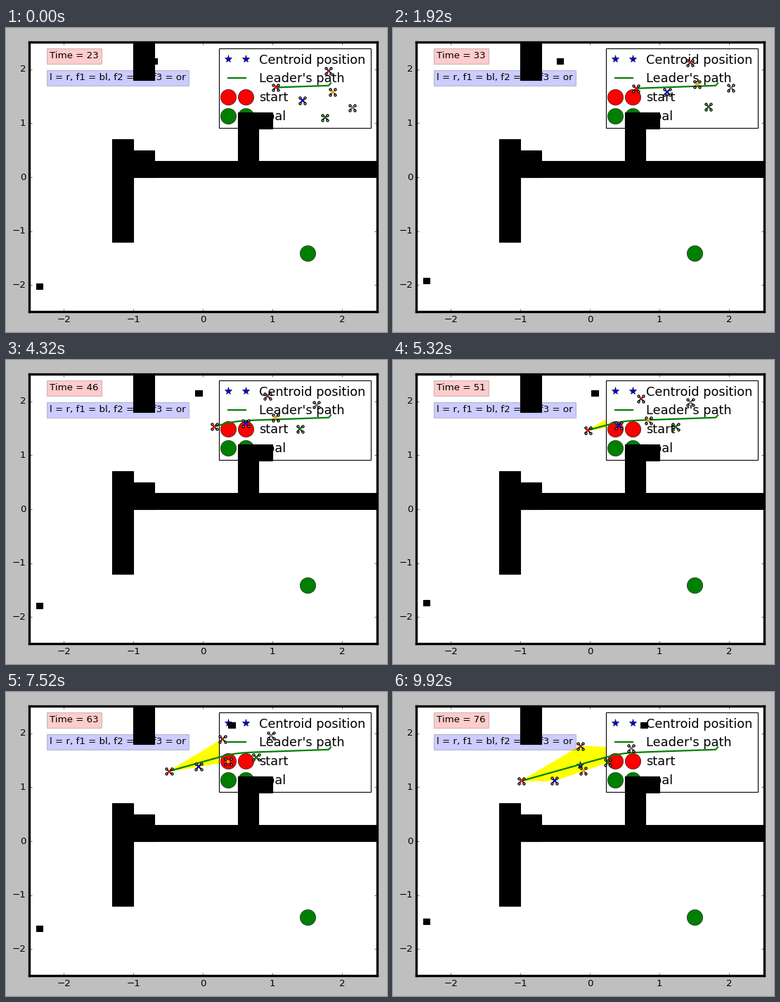
These frames come from a looping animation (542 px wide and 432 px high, 10000 ms). A matplotlib script:

```python
import numpy as np
import matplotlib.pyplot as plt
from matplotlib.animation import FuncAnimation
from matplotlib.patches import Polygon, Rectangle

plt.style.use("classic")

W, H, DPI = 542, 432, 80
LEFT, RIGHT, TOP, BOTTOM = 32.6, 527.6, 20.5, 403.5
SX, SY = (RIGHT - LEFT) / 5, (BOTTOM - TOP) / 5
TICK, LOOP = 40, 10000
T0, T1 = 23, 76

# Followers pass these pixel positions at the key times
KEY_TIMES = [23, 33, 56, 76]
FOLLOWERS = {
    "blue": [(421.5, 103), (390, 91), (301, 97.5), (229.5, 126)],
    "orange": [(464.5, 91), (432.5, 80), (343.5, 91), (270.5, 112)],
    "green": [(453.5, 127.5), (448.5, 112), (383.5, 93), (305.5, 100)],
    "gray": [(492.5, 113.5), (480.5, 85), (403.5, 59), (338.5, 80)],
    "brown": [(458.5, 61), (422.5, 49.5), (333.5, 60), (266.5, 77)],
}
COLORS = ["red", *FOLLOWERS]

# x, y, width, height in axes units
WALLS = [(-1.3, -1.2, 0.3, 1.9), (-1, 0, 0.3, 0.5), (-1, 0, 3.5, 0.3),
         (-1, 1.8, 0.3, 0.7), (0.5, 0.2, 0.3, 1.0), (0.5, 0.9, 0.5, 0.3)]


def to_data(points):
    """Pixels from the top left corner to axes units."""
    p = np.asarray(points, float)
    return np.column_stack([(p[:, 0] - LEFT) / SX - 2.5,
                            2.5 - (p[:, 1] - TOP) / SY])


def clock(ms):
    """Whole simulation seconds shown at a moment of the loop."""
    return T0 + (T1 - T0) * ms // (LOOP - 2 * TICK)


def path_y(x):
    """Nearly level on the right, bending smoothly into a descent."""
    return 84 - 0.035 * (x - 397) + 0.245 * 8 * np.logaddexp(0, (325 - x) / 8)


def lead_x(t):
    return 383.5 - 3.79 * (t - T0)


# One cubic per follower and axis
CURVES = [np.polyfit(np.subtract(KEY_TIMES, T0), p, 3)
          for p in FOLLOWERS.values()]


def robots(t):
    x = lead_x(t)
    s = t - T0
    points = [(x, path_y(x))]
    points += [np.array([s**3, s**2, s, 1]) @ c for c in CURVES]
    return to_data(points)


def trail(t):
    x = np.linspace(459, lead_x(t), 60)
    return to_data([(462, 78.5), *zip(x, path_y(x))])


fig = plt.figure(figsize=((W + 0.01) / DPI, (H + 0.01) / DPI), dpi=DPI,
                 facecolor="0.75")
ax = fig.add_axes([LEFT / W, 1 - BOTTOM / H, (RIGHT - LEFT) / W,
                   (BOTTOM - TOP) / H])
ax.set_xlim(-2.5, 2.5)
ax.set_ylim(-2.5, 2.5)
ax.set_xticks(range(-2, 3))
ax.set_yticks(range(-2, 3))
for spine in ax.spines.values():
    spine.set_linewidth(3)


def block(x, y, w, h):
    return ax.add_patch(Rectangle((x, y), w, h, fc="k", ec="k", zorder=6))


def note(y, text, color):
    return ax.text(-2.2, y, text, fontsize=12,
                   bbox=dict(facecolor=color, alpha=0.2))


for wall in WALLS:
    block(*wall)
top_box = block(0, 0, 0.1, 0.1)
left_box = block(0, 0, 0.1, 0.1)

hull = ax.add_patch(Polygon([(0, 0)] * 3, fc="yellow", ec="yellow", zorder=1))
star, = ax.plot([], [], "b*", ms=10, zorder=4, label="Centroid position")
path, = ax.plot([], [], "g-", lw=2, zorder=7, label="Leader's path")
start, = ax.plot([], [], "ro", ms=20, label="start")
goal, = ax.plot([1.505], [-1.41], "go", ms=20, label="goal")
ax.legend(handles=[star, path, start, goal], loc="upper right", fontsize=16,
          numpoints=2, framealpha=1)

label = note(2.2, "", "red")
# The wide gap lies behind the top wall
note(1.8, "l = r, f1 = bl, f2 =\u2003\u2003f3 = or", "blue")

arms, = ax.plot([], [], "kx", ms=7.5, mew=1.7, zorder=8)
rotors, = ax.plot([], [], "o", ms=2.7, mfc="white", mec="k", mew=1.2,
                  zorder=8.5)
bodies = [ax.plot([], [], "x", ms=3.8, mec=c, mew=1.8, zorder=9)[0]
          for c in COLORS]
CORNERS = np.array([(x / SX, y / SY) for x in (-3.8, 3.8)
                    for y in (-3.8, 3.8)])


def update(i):
    t = clock(i * TICK)
    label.set_text(f"Time = {t}")

    pos = robots(t)
    for body, (x, y) in zip(bodies, pos):
        body.set_data([x], [y])
    arms.set_data(*pos.T)
    rotors.set_data(*(pos[:, None] + CORNERS).reshape(-1, 2).T)

    lead, blue, orange, green, gray, brown = pos
    hull.set_xy([lead, blue, orange, green, gray, brown])
    cx, cy = pos.mean(axis=0)
    star.set_data([cx], [cy])
    path.set_data(*trail(t).T)

    top_box.set_xy((-0.76 + 0.028 * (t - T0), 2.1))
    left_box.set_xy((-2.4, -2.07 + 0.01 * (t - T0)))
    return []


anim = FuncAnimation(fig, update, frames=LOOP // TICK, interval=TICK,
                     repeat=True, repeat_delay=0, init_func=lambda: update(0))
plt.show()
```
